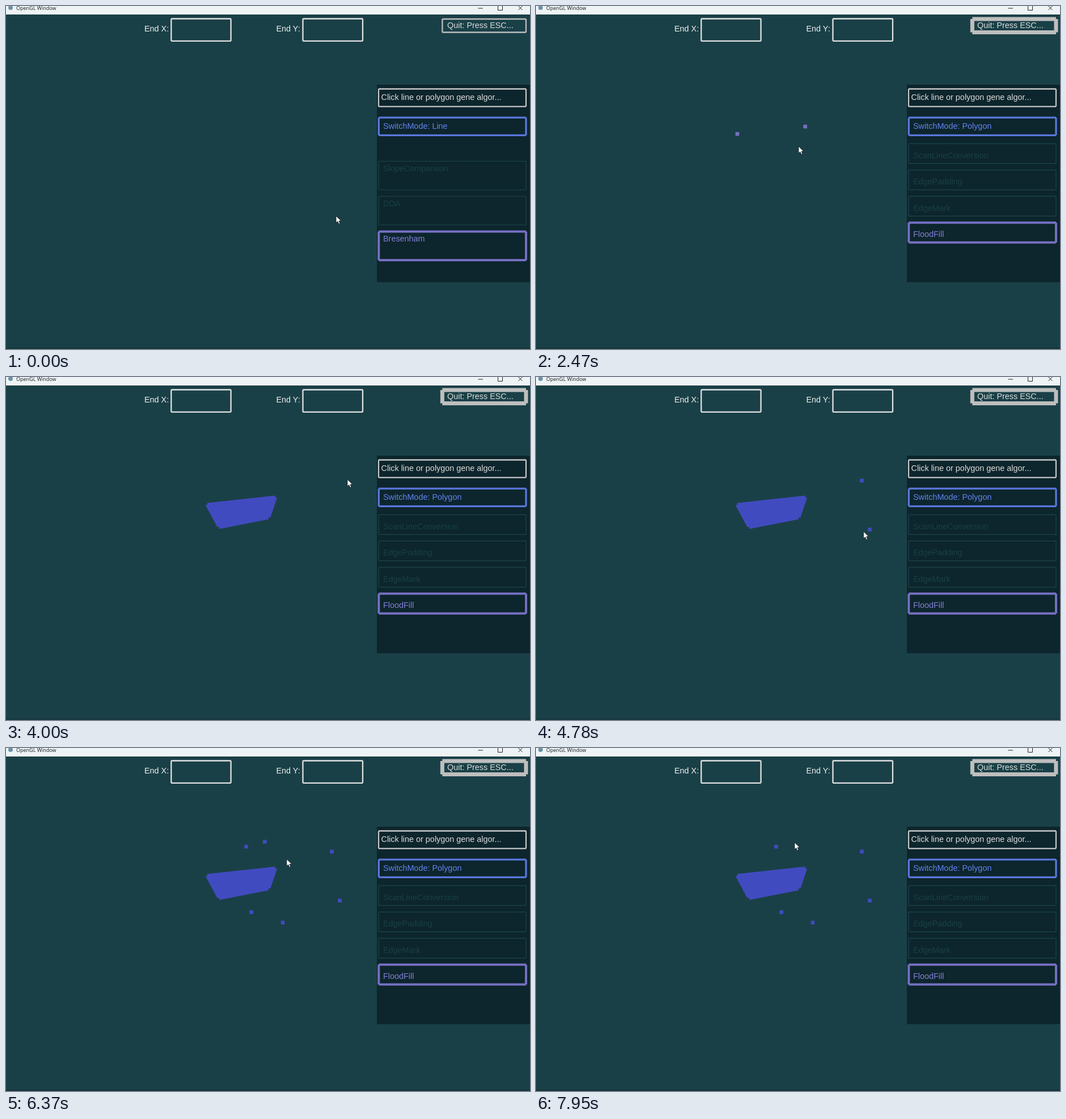
An HTML page for the animation above (8 s loop, 924 by 606 pixels).

```html
<!DOCTYPE html>
<html lang="en">
<head>
<meta charset="utf-8">
<title>Polygon drawing</title>
<style>
html, body { margin: 0; width: 100%; height: 100%; overflow: hidden; background: #1a4047; }
svg { display: block; width: 924px; height: 606px; }
text { font: 14.4px "Liberation Sans", Arial, sans-serif; fill: #dadcdc; white-space: pre; }
.title { font: 9px "Open Sans", "Noto Sans", sans-serif; fill: #15181a; }
.bright { fill: #eef0f0; }
.blue { fill: #6284f0; }
.violet { fill: #8480d8; }
.dim { fill: #1a4047; }
</style>
</head>
<body>
<svg id="stage" viewBox="0 0 924 606">
  <rect width="924" height="606" fill="#1a4047"/>
  <rect y="603" width="924" height="3" fill="#16383f"/>
  <rect width="924" height="15" fill="#eef4f6"/>
  <circle cx="8" cy="3" r="4" fill="#6c93a8"/>
  <text class="title" x="18" y="7">OpenGL Window</text>
  <path d="M832.5 4H841M867.5 -1V7.5H875.5V-1M903.5 0L910.5 7M910.5 0L903.5 7" fill="none" stroke="#1c1f21"/>
  <rect x="654" y="139" width="270" height="349" fill="#0d252c"/>
  <g id="common"></g>
  <g id="lineMode"></g>
  <g id="polyMode"></g>
  <g id="drawing"></g>
  <path id="cursor" d="M0 0V12.2L2.8 9.6L4.9 14.3L7 13.3L5 8.9L8.9 8.6Z" fill="#fff" stroke="#10181c" stroke-width=".8"/>
</svg>
<script>
const LOOP = 8000, TURN = 7000, STEP = 60;
const BLUE = '#5a78de', VIOLET = '#7570c2', INK = '#414bc0', DIM = '#1a4047';
const $ = id => document.getElementById(id);

function add(parent, tag, attrs, content = '') {
  const el = document.createElementNS('http://www.w3.org/2000/svg', tag);
  for (const k in attrs) el.setAttribute(k, attrs[k]);
  el.textContent = content;
  parent.append(el);
  return el;
}
const label = (g, x, y, s, cls = '') => add(g, 'text', { x, y, class: cls }, s);

// Four butt-ended lines leave small notches at the corners.
const box = (g, x0, y0, x1, y1, w, stroke) => add(g, 'path', {
  d: `M${x0} ${y0}H${x1}M${x0} ${y1}H${x1}M${x0} ${y0}V${y1}M${x1} ${y0}V${y1}`,
  'stroke-width': w, stroke, fill: 'none'
});

function button(g, name, y, height, textY, selected) {
  box(g, 657.3, y, 917, y + height, selected ? 4 : 1.4, selected ? VIOLET : DIM);
  label(g, 665, textY, name, selected ? 'violet' : 'dim');
}

const common = $('common'), lineMode = $('lineMode'), polyMode = $('polyMode'), drawing = $('drawing');
label(common, 244, 45, 'End X:', 'bright');
box(common, 291.3, 22.5, 396.6, 61.8, 2.3, '#e0e2e2');
label(common, 476.5, 45, 'End Y:', 'bright');
box(common, 523.5, 22.5, 629, 61.8, 2.3, '#e0e2e2');
const quit = box(common, 769.4, 23, 917, 46.5, 2.3, '#bebebe');
label(common, 778, 39, 'Quit: Press ESC...');
box(common, 657, 146.5, 917, 177.6, 2.3, '#c6c8c8');
label(common, 661.5, 166, 'Click line or polygon gene algor...');
box(common, 657.3, 197.2, 917, 228.3, 3.3, BLUE);

label(lineMode, 665, 217, 'SwitchMode: Line', 'blue');
['SlopeComparison', 'DDA', 'Bresenham'].forEach((name, i) =>
  button(lineMode, name, 274.4 + 62 * i, 50.5, 292 + 62 * i, i === 2));

label(polyMode, 665, 217, 'SwitchMode: Polygon', 'blue');
['ScanLineConversion', 'EdgePadding', 'EdgeMark', 'FloodFill'].forEach((name, i) =>
  button(polyMode, name, 243.3 + 46.5 * i, 35, 269 + 46.4 * i, i === 3));

// Each shape: corner x, y and the time of its click, then the time span of its fill.
const shapes = [
  { dot: VIOLET, from: 3520, to: 6410,
    pts: [[355, 226, 1920], [474.7, 213, 2280], [463, 248, 2650], [376, 265, 3160]] },
  { dot: INK, from: 6410, to: LOOP,
    pts: [[574.5, 183, 4240], [588.5, 269.5, 4700], [488, 308.5, 5080],
          [432.7, 290, 5380], [423.5, 174.3, 5800], [456.3, 165.6, 6050]] }
];

// Every edge is sheared along its minor axis, as wide raster lines are.
function outline(pts) {
  const h = 3.4;
  let d = 'M' + pts.map(p => p[0] + ' ' + p[1]).join('L') + 'Z';
  pts.forEach(([x, y], i) => {
    const [u, v] = pts[(i + 1) % pts.length];
    const flat = Math.abs(u - x) > Math.abs(v - y);
    const a = flat ? 0 : h, b = flat ? h : 0;
    const quad = [[x - a, y - b], [u - a, v - b], [u + a, v + b], [x + a, y + b]];
    const area = quad.reduce((s, p, k) => {
      const q = quad[(k + 1) % 4];
      return s + p[0] * q[1] - q[0] * p[1];
    }, 0);
    if (area < 0) quad.reverse();
    d += 'M' + quad.map(p => p.join(' ')).join('L') + 'Z';
  });
  return d;
}

for (const s of shapes) {
  s.fill = add(drawing, 'path', { d: outline(s.pts), fill: INK });
  s.dots = s.pts.map(([x, y]) => add(drawing, 'rect',
    { x: x - 3.3, y: y - 3.3, width: 6.6, height: 6.6, fill: s.dot }));
}

// Pointer path: time, x, y
const path = [
  [60, 582, 371], [880, 715, 213], [1000, 718, 212], [1180, 718, 212],
  [1680, 347, 221], [1860, 355, 226], [1920, 355, 226], [2160, 472, 204],
  [2260, 475, 213], [2300, 475, 213], [2460, 463, 248], [2700, 463, 248],
  [3100, 376, 265], [3180, 376, 265], [3400, 379, 275], [3520, 382, 275],
  [4000, 602, 181], [4180, 574, 183], [4280, 574, 183], [4640, 588, 269],
  [4720, 588, 269], [5020, 488, 308], [5140, 488, 307], [5320, 432, 290],
  [5380, 432, 290], [5500, 423, 239], [5740, 423, 174], [5800, 423, 174],
  [5980, 456, 167], [6050, 456, 167], [6710, 546, 235], [6775, 546, 235],
  [6790, 544, 259], [6850, 548, 270], [6910, 551, 280]
];

function pointer(t) {
  const i = path.findIndex(k => k[0] > t);
  if (i < 1) return path.at(i).slice(1);
  const [a, x, y] = path[i - 1], [b, u, v] = path[i];
  const p = (t - a) / (b - a), e = p * p * (3 - 2 * p);
  return [x + (u - x) * e, y + (v - y) * e];
}

// The screen refreshes in short steps, restarting at these times.
const starts = [0, 100, 940, 1800, 2650, 3460, 4300, 5140, 5990, 6790];
function stepped(t) {
  const start = starts.findLast(s => s <= t);
  return start + Math.floor((t - start) / STEP) * STEP;
}

const show = (el, on) => el.setAttribute('visibility', on ? 'visible' : 'hidden');

function draw(now) {
  const time = now % LOOP;
  // Past the turn the action runs backwards.
  const t = stepped(time < TURN ? time : 2 * TURN - 1 - time);
  const poly = t >= 940;
  show(lineMode, !poly);
  show(polyMode, poly);
  quit.setAttribute('stroke-width', poly ? 7 : 2.3);
  for (const s of shapes) {
    show(s.fill, t >= s.from && t < s.to);
    s.dots.forEach((dot, i) => show(dot, t >= s.pts[i][2] && t < s.from));
  }
  const [x, y] = pointer(t);
  $('cursor').setAttribute('transform', `translate(${x.toFixed(1)} ${y.toFixed(1)})`);
}

let origin;
function frame(now) {
  origin ??= now;
  draw(now - origin);
  requestAnimationFrame(frame);
}
draw(0);
requestAnimationFrame(frame);
</script>
</body>
</html>
```
